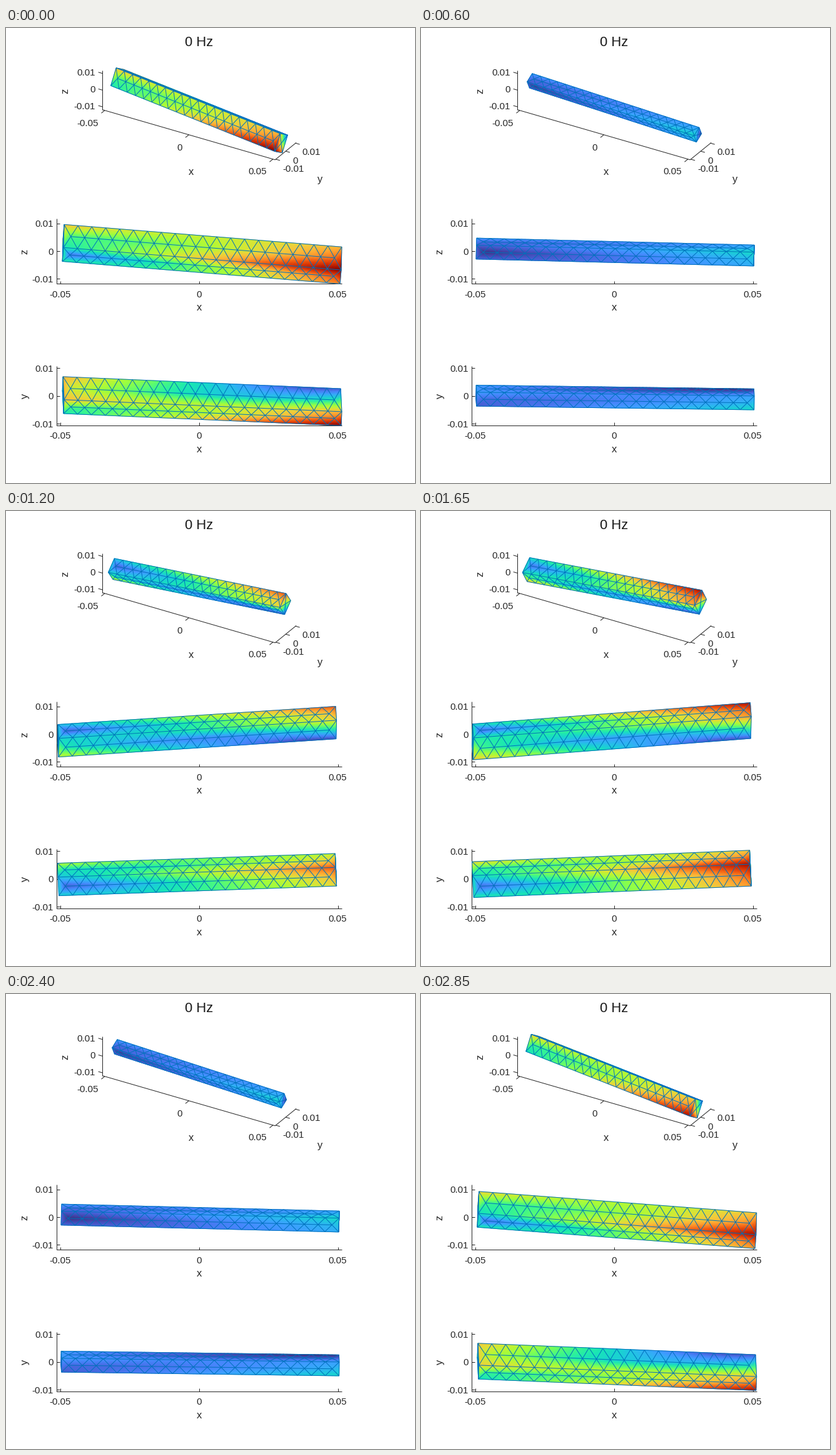
A matplotlib script that plays this animation: 654x728 px, repeating every 3000 ms.

```python
import numpy as np
import matplotlib.pyplot as plt
from matplotlib.animation import FuncAnimation
from matplotlib.collections import LineCollection
from matplotlib.tri import Triangulation

WIDTH, HEIGHT, DPI = 654, 728, 100
FRAMES, INTERVAL = 20, 150
INK = "#262626"
EDGE = (0, 0.447, 0.741)
PX = 0.72  # points per pixel

plt.rcParams["font.family"] = "Liberation Sans"

# Square beam, metres
LENGTH, SIDE, CELLS = 0.1, 0.005, 20

# Linearised rigid-body mode: shift + spin x r
SHIFT = np.array([0.00101, -0.00189, -0.00109])
SPIN = np.array([1.66, 0.0808, -0.0432])

# Half extents of the motion, used as axis limits
LIMIT = np.array([0.0513, 0.01066, 0.01177])


class View:
    """Orthographic projection to stage pixels."""

    def __init__(self, origin, ex, ey, ez):
        self.origin = np.array(origin)
        self.basis = np.array([ex, ey, ez])

    def __call__(self, points):
        return np.asarray(points) @ self.basis + self.origin


SCALE = 4440
PERSP = View((309.2, 125.7), (2690, 780), (1580, -1285), (0, -2670))
FRONT = View((309.1, 357), (SCALE, 0), (0, 0), (0, -SCALE))
ABOVE = View((309.1, 588.6), (SCALE, 0), (0, -SCALE), (0, 0))


def build_mesh():
    """Nodes and outward triangles; each side has a staggered midline."""
    h = SIDE / 2
    corners = [(-h, -h), (h, -h), (h, h), (-h, h)]
    xs = np.linspace(-LENGTH / 2, LENGTH / 2, CELLS + 1)
    mids = (xs[1:] + xs[:-1]) / 2
    nodes, tris = [], []

    def add(points):
        start = len(nodes)
        nodes.extend(points)
        return list(range(start, len(nodes)))

    rails = [add([(x, y, z) for x in xs]) for y, z in corners]
    for k in range(4):
        a, b = rails[k], rails[(k + 1) % 4]
        y, z = np.add(corners[k], corners[(k + 1) % 4]) / 2
        m = add([(x, y, z) for x in mids])
        for rail in (a, b):
            tris += [(rail[i], rail[i + 1], m[i]) for i in range(CELLS)]
            tris += [(m[i], m[i + 1], rail[i + 1]) for i in range(CELLS - 1)]
        tris += [(a[0], b[0], m[0]), (a[-1], b[-1], m[-1])]
    for end in (0, -1):
        centre = add([(xs[end], 0, 0)])[0]
        tris += [(rails[k][end], rails[(k + 1) % 4][end], centre)
                 for k in range(4)]

    nodes, tris = np.array(nodes, float), np.array(tris)
    p, q, r = (nodes[tris[:, j]] for j in range(3))
    normal = np.cross(q - p, r - p)
    inward = np.sum(normal * (p + q + r), axis=1) < 0
    tris[inward] = tris[inward][:, ::-1]
    return nodes, tris


def split_triangle(n):
    """Barycentric weights and triangles of a triangle cut n times per side."""
    index, weights = {}, []
    for i in range(n + 1):
        for j in range(n + 1 - i):
            index[i, j] = len(weights)
            weights.append((i / n, j / n, (n - i - j) / n))
    parts = []
    for i in range(n):
        for j in range(n - i):
            parts.append((index[i, j], index[i + 1, j], index[i, j + 1]))
            if i + j < n - 1:
                parts.append((index[i + 1, j], index[i + 1, j + 1],
                              index[i, j + 1]))
    return np.array(weights), np.array(parts)


NODES, TRIS = build_mesh()
MOVE = SHIFT + np.cross(SPIN, NODES)
SIZE = np.linalg.norm(MOVE, axis=1)
SIZE /= SIZE.max()
WEIGHTS, PARTS = split_triangle(4)

fig = plt.figure(figsize=(WIDTH / DPI, HEIGHT / DPI), dpi=DPI,
                 facecolor="white")
ax = fig.add_axes([0, 0, 1, 1])
ax.set_xlim(0, WIDTH)
ax.set_ylim(HEIGHT, 0)
ax.axis("off")
ax.autoscale(False)


def line(points, snap=None):
    xs, ys = np.transpose(points)
    ax.plot(xs, ys, color=INK, lw=PX, zorder=1, snap=snap,
            solid_capstyle="butt")


def text(x, y, label, size=15, ha="center", rise=0.345, color=INK, rotation=0):
    """Place a label by the middle of its glyphs; rise is in ems."""
    dx, dy = (size * rise, 0) if rotation else (0, size * rise)
    ax.text(x + dx, y + dy, label, fontsize=size * PX, ha=ha, va="baseline",
            color=color, rotation=rotation, rotation_mode="anchor")


def name(x, y, label, rotation=0):
    text(x, y, label, 16.5, rise=0.16 if label == "y" else 0.265,
         rotation=rotation)


def flat_axes(view, axis, label, label_x):
    """Side or plan view: x along the bottom, one other axis on the left."""
    def at(x, v):
        point = np.zeros(3)
        point[0], point[axis] = x, v
        return view(point)

    lx, lv = LIMIT[0], LIMIT[axis]
    corner = at(-lx, -lv)
    line([at(-lx, lv), corner, at(lx, -lv)], True)
    for v, s in ((0.01, "0.01"), (0, "0"), (-0.01, "-0.01")):
        p = at(-lx, v)
        line([p, p + (4.5, 0)], True)
        text(75.5, p[1] + 0.4, s, ha="right")
    for x, s in ((-0.05, "-0.05"), (0, "0"), (0.05, "0.05")):
        p = at(x, -lv)
        line([p, p - (0, 4.5)], True)
        text(p[0] - 0.5, corner[1] + 16.3, s)
    name(308.5, corner[1] + 38.5, "x")
    name(label_x, view.origin[1] + 0.5, label, 90)


def solid_axes():
    lx, ly, lz = LIMIT
    line(PERSP([(-lx, -ly, lz), (-lx, -ly, -lz)]), True)
    line(PERSP([(-lx, -ly, -lz), (lx, -ly, -lz), (lx, ly, -lz)]))

    def tick(point, direction):
        p = PERSP(point)
        line([p, p + direction])

    for v in (-0.01, 0, 0.01):
        tick((-lx, -ly, v), (-6.7, -1.9))
        tick((lx, v, -lz), (6.7, 1.9))
    for v in (-0.05, 0, 0.05):
        tick((v, -ly, -lz), (-5.4, 4.4))
    for y, s in ((71, "0.01"), (98, "0"), (125, "-0.01")):
        text(142.5, y, s, ha="right")
    text(130.5, 152, "-0.05")
    text(277.5, 190.5, "0")
    text(402.5, 229, "0.05")
    for x, y, s in ((473.5, 198, "0.01"), (458.5, 212, "0"),
                    (442.5, 225, "-0.01")):
        text(x, y, s, ha="left")
    name(295.5, 231, "x")
    name(502.5, 244.5, "y")
    name(95.5, 101, "z", 90)


solid_axes()
flat_axes(FRONT, 2, "z", 30)
flat_axes(ABOVE, 1, "y", 32)
text(309, 21.5, "0 Hz", 22, color="#1a1a1a")

artists = []


def draw_beam(view, nodes, values):
    flat = view(nodes)
    p, q, r = (flat[TRIS[:, j]] for j in range(3))
    area = ((q[:, 0] - p[:, 0]) * (r[:, 1] - p[:, 1])
            - (q[:, 1] - p[:, 1]) * (r[:, 0] - p[:, 0]))
    seen = TRIS[area < -1e-6]

    # Interpolate the value, not the colour, inside each triangle
    points = np.einsum("wc,tcd->twd", WEIGHTS, flat[seen]).reshape(-1, 2)
    shade = (values[seen] @ WEIGHTS.T).ravel()
    starts = np.arange(len(seen)) * len(WEIGHTS)
    parts = (starts[:, None, None] + PARTS).reshape(-1, 3)
    surface = Triangulation(points[:, 0], points[:, 1], parts)
    artists.append(ax.tripcolor(surface, shade, shading="gouraud",
                                cmap="turbo", vmin=0, vmax=1, zorder=2))

    pairs = np.vstack([seen[:, [0, 1]], seen[:, [1, 2]], seen[:, [2, 0]]])
    pairs = np.unique(np.sort(pairs, axis=1), axis=0)
    edges = LineCollection(flat[pairs], colors=[EDGE], linewidths=PX, zorder=3)
    artists.append(ax.add_collection(edges, autolim=False))


def update(i):
    while artists:
        artists.pop().remove()
    swing = np.cos(2 * np.pi * i / FRAMES)
    for view in (PERSP, FRONT, ABOVE):
        draw_beam(view, NODES + swing * MOVE, abs(swing) * SIZE)
    return []


anim = FuncAnimation(fig, update, frames=FRAMES, init_func=lambda: [],
                     interval=INTERVAL, repeat=True, repeat_delay=0)
plt.show()
```
